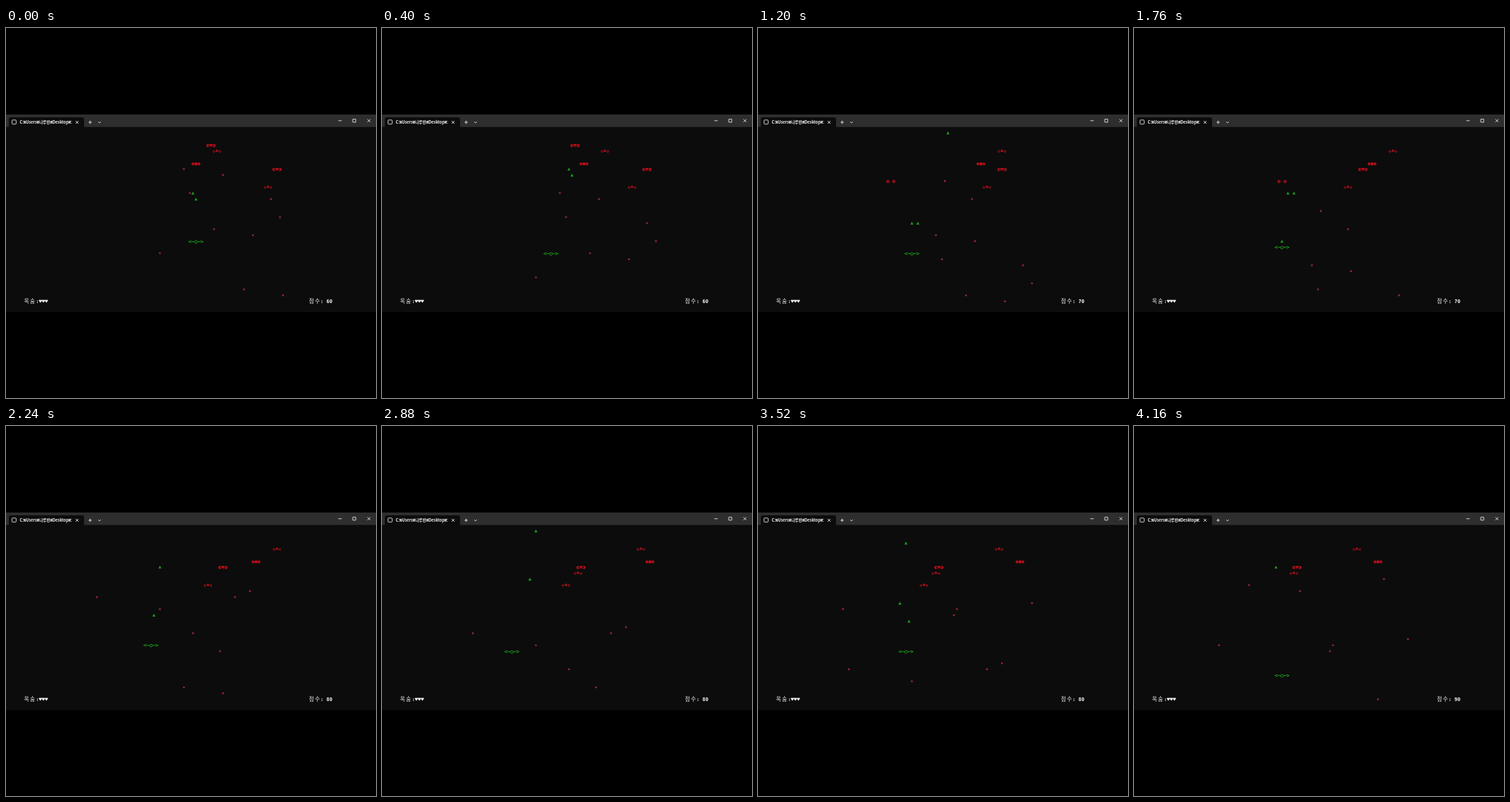
Recreate the animation shown at these times as an HTML page. Size 526 by 526 pixels, loop 4240 ms.

```html
<!DOCTYPE html>
<html lang="ko">
<head>
<meta charset="utf-8">
<title>Console shooter</title>
<style>
  html, body { margin: 0; width: 100%; height: 100%; overflow: hidden; background: #000; }
  svg { display: block; width: 100vw; height: 100vh; }
  .kr { font-family: "Noto Sans CJK KR", "Noto Sans CJK", sans-serif; fill: #f8f8f8; }
  .mono { font: 7.09px "DejaVu Sans Mono", monospace; }
  .label { font-size: 7.5px; letter-spacing: 1.6px; }
  .white { fill: #f8f8f8; }
  .bold { font-weight: bold; }
  .mid { text-anchor: middle; }
  .foe { fill: #bf101c; stroke: #bf101c; stroke-width: .3; }
  .ring { fill: none; stroke: #bf101c; stroke-width: .9; }
  .ship { fill: #1a9c1a; stroke: #1a9c1a; stroke-width: .3; }
  .bolt { fill: #1a9c1a; }
  .star { fill: #a82c36; }
  .line { fill: none; stroke: #f0f0f0; stroke-width: .85; }
</style>
</head>
<body>
<svg viewBox="0 0 526 526">
  <rect width="526" height="526" fill="#000"/>
  <rect y="123" width="526" height="281" fill="#0c0c0c"/>
  <rect y="123" width="526" height="17.7" fill="#2e2e2e"/>
  <path d="M4 141V130Q4 127 7 127H108Q111 127 111 130V141Z" fill="#0c0c0c"/>
  <rect class="line" x="8.6" y="130.8" width="5.8" height="5.8" rx=".8"/>
  <text class="kr bold" x="19.5" y="135.9" font-size="5.65">C:₩Users₩나루빈₩Desktop₩:</text>
  <path class="line" d="M99 132l4 4m0-4l-4 4M117.2 134h4.8m-2.4-2.4v4.8M131 133.2l1.9 1.9l1.9-1.9"/>
  <path class="line" d="M472.4 131.8h4.8M493 129.7h4.2v4.2h-4.2zM513.8 129.7l4.2 4.2m0-4.2l-4.2 4.2"/>
  <text class="kr label" x="25.8" y="390.5">목숨</text>
  <text class="mono white bold" x="42.4" y="390.5">:♥♥♥</text>
  <text class="kr label" x="430.8" y="390.5">점수</text>
  <text class="mono white bold" x="447" y="390.5">:</text>
  <text class="mono white bold" id="score" x="455.4" y="390.5"></text>
  <g id="game"></g>
</svg>
<script>
const LOOP = 4240, STEP = 80, TICK = 110, LEAD = 68;
const HELD = [1, 3, 13, 16, 21, 26, 27, 51]; // steps on which the picture stands still
const LEFT = 23, RIGHT = 91, LAST_ROW = 28;

// col is the column at tick 0
const foe = (look, col, row, dir, from = -99, to = 99) => ({ look, col, row, dir, from, to });
const foes = {
  a: foe("◐▼◑", 68, 2, -1),
  b: foe("crown", 70, 3, 1),
  c: foe("◈◉◈", 63, 5, 1),
  d: foe("◐▼◑", 90, 6, 1),
  e: foe("crown", 87, 9, -1),
  f: foe("◎ ◎", 46, 6, -1),
  g: foe("◎ ◎", 33, 8, 1, 10),
  h: foe("crown", 91, 7, -1, 24),
  z: foe("◎ ◎", 55, 1, -1, -99, -1)
};
// Foes firing in each volley; one volley every ten ticks
const volleys = ["az", "acz", "acdez", "ac", "cdfg", "cdfh", "cfh"];
const volleyTick = i => 10 * i - 23;

// Ship key points: tick, column, row
const path = [[-14, 52, 18], [-6, 63, 18], [0, 63, 18], [6, 53, 21], [7, 52, 21], [8, 51, 19],
  [11, 51, 20], [16, 49, 19], [20, 48, 19], [26, 43, 20], [27, 47, 18], [29, 50, 19],
  [32, 49, 20], [38, 49, 24]];
const shots = [-14, -7, -6, 6, 8, 16, 27, 29];

const px = col => 1.2 + 4.267 * col;
const py = row => 149.2 + 8.55 * row;
const game = document.getElementById("game");
const score = document.getElementById("score");

// Foes bounce between two columns
function foeCol({ col, dir }, tick) {
  const c = col + dir * tick;
  if (c > RIGHT) return 2 * RIGHT - c;
  return c < LEFT ? 2 * LEFT - c : c;
}

function shipAt(tick) {
  const i = Math.max(1, path.findIndex(p => p[0] >= tick));
  const [t0, c0, r0] = path[i - 1], [t1, c1, r1] = path[i];
  const k = (tick - t0) / (t1 - t0);
  return [Math.round(c0 + (c1 - c0) * k), Math.round(r0 + (r1 - r0) * k)];
}

// Bolts rise one row per tick until they leave the top or hit a foe
const kills = [];
const bolts = shots.map(from => {
  const [col, row] = shipAt(from);
  const bolt = { col, from, top: row - 1 + from, to: row - 1 + from };
  for (let t = from; t <= bolt.to; t++) {
    const hit = Object.values(foes).find(f => {
      const gap = col - foeCol(f, t);
      return f.row === bolt.top - t && t >= f.from && t <= f.to && gap >= 1 && gap <= 3;
    });
    if (hit && t < LOOP / TICK) {
      kills.push(t);
      hit.to = bolt.to = t - 1;
    }
  }
  return bolt;
});

function starPath() {
  let d = "";
  for (let i = 0; i < 10; i++) {
    const r = i % 2 ? .9 : 2, a = Math.PI * (i / 5 - .5);
    d += (i ? "L" : "M") + (r * Math.cos(a)).toFixed(2) + " " + (r * Math.sin(a)).toFixed(2);
  }
  return d + "Z";
}
const STAR = starPath();
const BOLT = "M0 -2.1L2.2 2.1H-2.2Z";
const PEAK = "M0 -2.6L1.9 .9H-1.9Z";
const RING = "M-1.3 .6a1.3 1.3 0 1 0 2.6 0a1.3 1.3 0 1 0 -2.6 0";

const label = (cls, s, col, row) =>
  `<text class="mono mid ${cls}" x="${px(col)}" y="${py(row) + 2.6}">${s}</text>`;
const mark = (cls, d, col, row) =>
  `<path class="${cls}" d="${d}" transform="translate(${px(col)} ${py(row)})"/>`;
const crown = (col, row) =>
  mark("ring", RING, col - 1, row) + mark("foe", PEAK, col, row) + mark("ring", RING, col + 1, row);

function draw(tick) {
  const alive = o => tick >= o.from && tick <= o.to;
  let out = "";
  for (const f of Object.values(foes).filter(alive)) {
    const col = foeCol(f, tick);
    out += f.look === "crown" ? crown(col, f.row) : label("foe", f.look, col, f.row);
  }
  volleys.forEach((keys, i) => {
    const at = volleyTick(i), age = tick - at;
    if (age < 0) return;
    for (const key of keys) {
      const row = foes[key].row + 2 + age;
      if (row <= LAST_ROW) out += mark("star", STAR, foeCol(foes[key], at) + 1, row);
    }
  });
  for (const b of bolts.filter(alive)) out += mark("bolt", BOLT, b.col, b.top - tick);
  out += label("ship", "&lt;−○−&gt;", ...shipAt(tick));
  game.innerHTML = out;
  score.textContent = 50 + 10 * kills.filter(t => tick >= t).length;
}

function tickAt(time) {
  let step = Math.floor(time / STEP);
  while (HELD.includes(step)) step--;
  return step ? Math.floor((step * STEP + LEAD) / TICK) : 0;
}

let shown = -1;
function frame() {
  const tick = tickAt(performance.now() % LOOP);
  if (tick !== shown) draw(shown = tick);
  requestAnimationFrame(frame);
}
frame();
</script>
</body>
</html>
```
